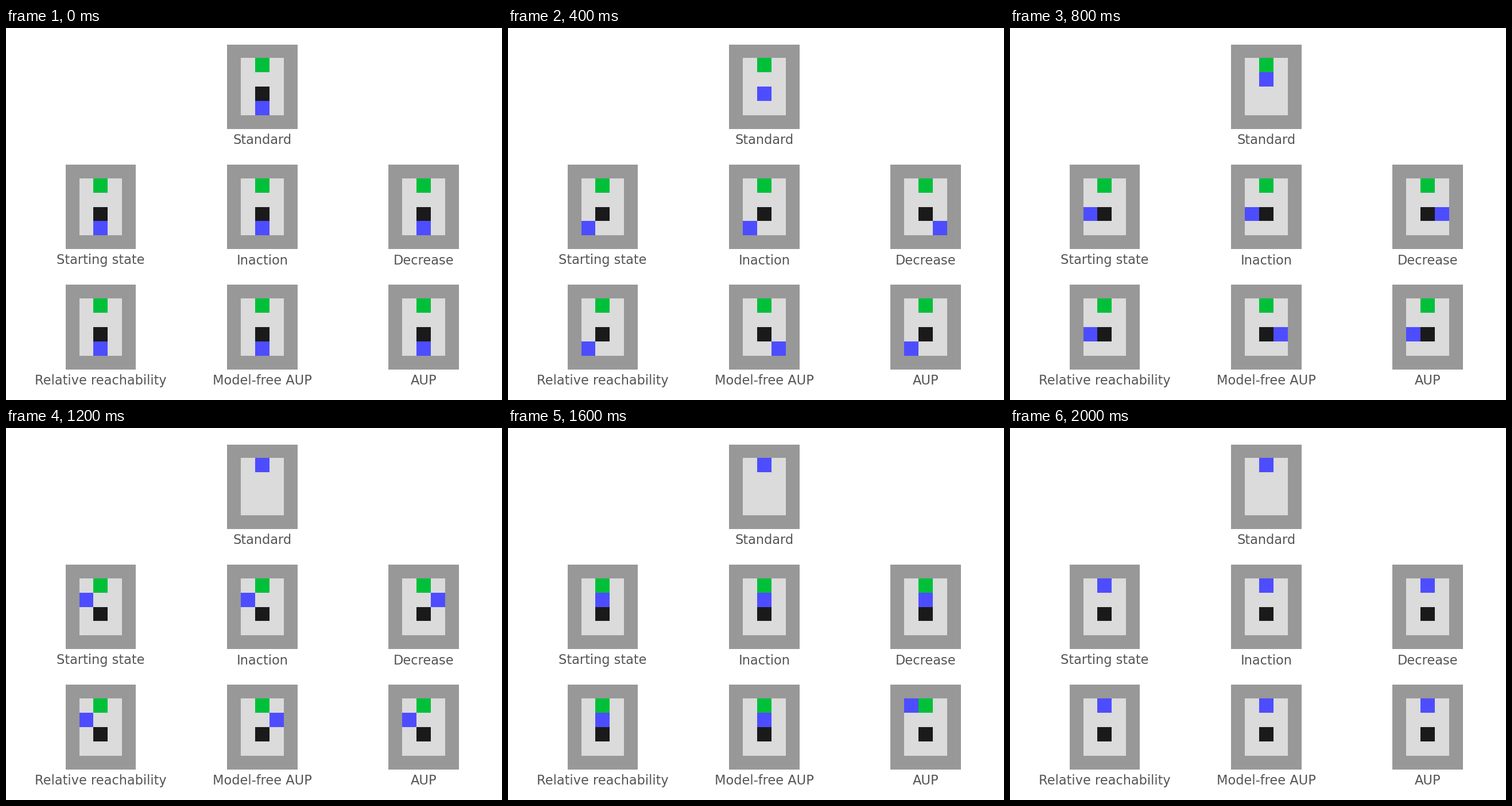
These frames come from a looping animation (864x648 px, 2.4 s). A matplotlib script:

```python
import matplotlib.pyplot as plt
from matplotlib.animation import FuncAnimation
from matplotlib.patches import Rectangle

W, H, DPI = 864, 648, 135
WALL, FLOOR = "#989898", "#dbdbdb"
GOAL, CRATE, AGENT = "#00c03a", "#1a1a1a", "#4d4dff"
STEPS = {"U": (0, -1), "L": (-1, 0), "R": (1, 0), ".": (0, 0)}
START, CRATE_CELL, GOAL_CELL = (1, 3), (1, 2), (1, 0)

# label, grid column, grid row, agent moves
PANELS = [
    ("Standard", 1, 0, "UUU.."),
    ("Starting state", 0, 1, "LUURU"),
    ("Inaction", 1, 1, "LUURU"),
    ("Decrease", 2, 1, "RUULU"),
    ("Relative reachability", 0, 2, "LUURU"),
    ("Model-free AUP", 1, 2, "RUULU"),
    ("AUP", 2, 2, "LUUUR"),
]

fig = plt.figure(figsize=(W / DPI, H / DPI), dpi=DPI, facecolor="white")
ax = fig.add_axes([0, 0, 1, 1])
ax.set_xlim(0, W)
ax.set_ylim(H, 0)
ax.axis("off")


def box(x0, y0, x1, y1, color, z):
    x0, y0, x1, y1 = (round(v) for v in (x0, y0, x1, y1))
    patch = Rectangle((x0, y0), x1 - x0, y1 - y0, facecolor=color,
                      linewidth=0, antialiased=False, zorder=z)
    return ax.add_patch(patch)


class Panel:
    def __init__(self, label, col, row, moves):
        self.col, self.row = col, row
        self.path = [START]
        for m in moves:
            (x, y), (dx, dy) = self.path[-1], STEPS[m]
            self.path.append((x + dx, y + dy))

        left, top = 103.8 + 281.1 * col, 28.7 + 209.3 * row
        box(left, top, left + 122.6, top + 147.3, WALL, 1)
        box(*self.corner(0, 0), *self.corner(3, 4), FLOOR, 2)
        self.cell(GOAL_CELL, GOAL, 3)
        self.crate = self.cell(CRATE_CELL, CRATE, 3)
        self.agent = self.cell(START, AGENT, 4)
        ax.text(left + 61.3, 202.2 + 209.3 * row, label, ha="center",
                va="baseline", fontsize=12, color="#555555",
                family="DejaVu Sans")

    def corner(self, x, y):
        return (127.6 + 281.25 * self.col + 24.9 * x,
                52.45 + 209.4 * self.row + 24.85 * y)

    def bounds(self, cell):
        x, y = cell
        return self.corner(x, y) + self.corner(x + 1, y + 1)

    def cell(self, cell, color, z):
        return box(*self.bounds(cell), color, z)

    def show(self, step):
        x0, y0, x1, y1 = (round(v) for v in self.bounds(self.path[step]))
        self.agent.set_bounds(x0, y0, x1 - x0, y1 - y0)
        # the crate is gone once the agent has run into it
        self.crate.set_visible(CRATE_CELL not in self.path[:step + 1])


panels = [Panel(*p) for p in PANELS]


def update(step):
    for p in panels:
        p.show(step)
    return [a for p in panels for a in (p.crate, p.agent)]


def reset():
    return update(0)


anim = FuncAnimation(fig, update, frames=6, init_func=reset, interval=400,
                     repeat=True, repeat_delay=0, blit=False)
plt.show()
```
